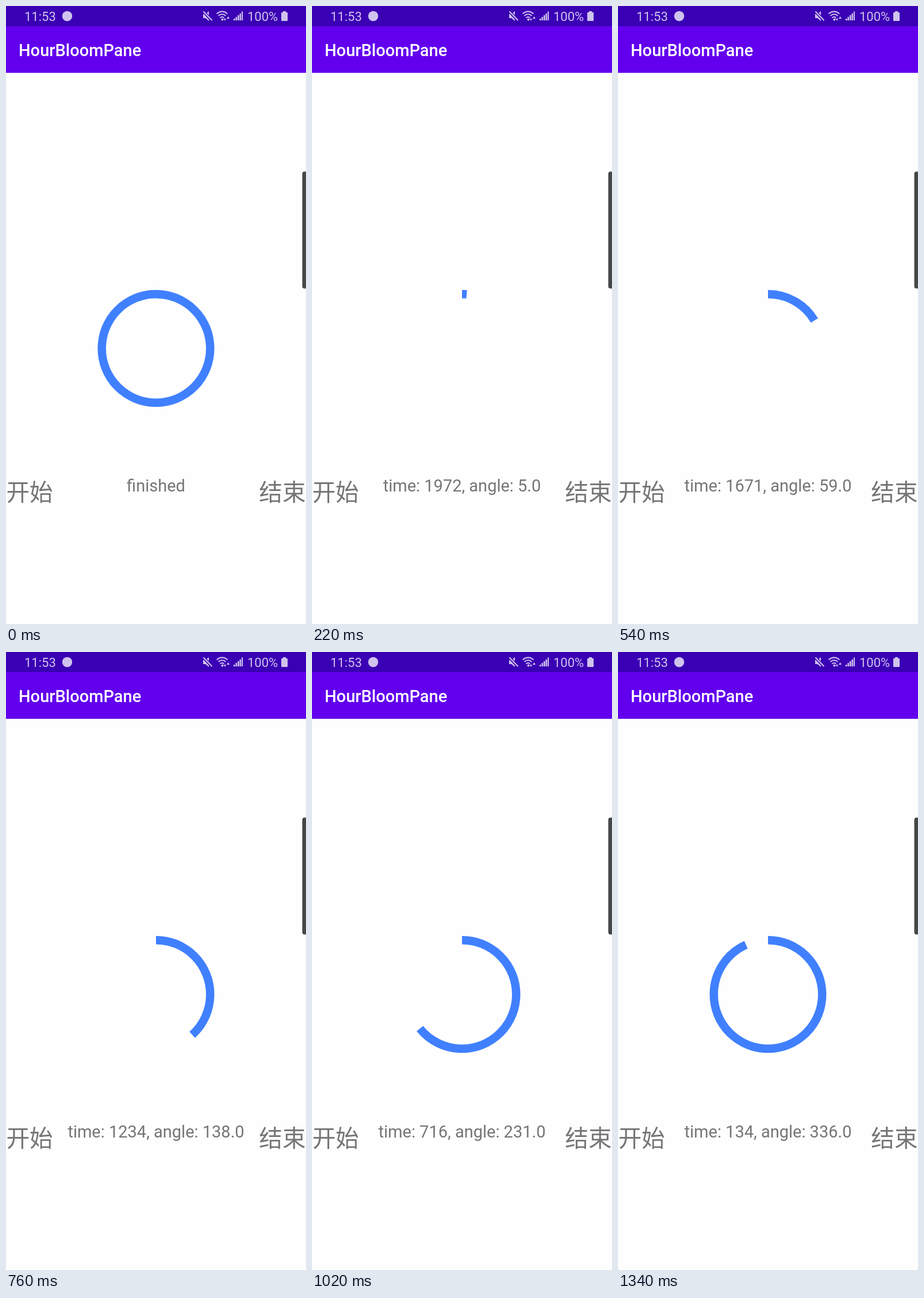
An HTML page that plays this animation: 522x1073 px, repeating every 1.36 s.

```html
<!DOCTYPE html>
<html lang="zh">
<head>
<meta charset="utf-8">
<title>Countdown ring</title>
<style>
  html, body { margin: 0; height: 100%; overflow: hidden; background: #fefefe; }
  svg { display: block; width: 522px; height: 1073px; font-family: Roboto, sans-serif; }
  .status { fill: #d0c3ed; font-size: 22px; }
  .line { fill: none; stroke: #d0c3ed; stroke-width: 2; }
  .title { fill: #fff; font-size: 29px; font-weight: 500; }
  .label { fill: #757575; font-size: 29px; text-anchor: middle; }
  .button { fill: #757575; font: 40.6px "Noto Sans CJK SC", "Noto Sans CJK", sans-serif; }
</style>
</head>
<body>
<svg viewBox="0 0 522 1073">
  <rect width="522" height="116" fill="#6200ee"/>
  <rect width="522" height="35" fill="#3a00b4"/>
  <g class="status">
    <text x="32" y="26">11:53</text>
    <circle cx="106.5" cy="17.5" r="8.7"/>
    <!-- muted speaker -->
    <path d="M343 14h4l6-5v17l-6-5h-4z"/>
    <path d="M343 9l15 16" stroke="#3a00b4" stroke-width="5"/>
    <path class="line" d="M343.5 9.5l15 15.5"/>
    <!-- wifi with traffic arrows -->
    <path class="line" d="M366.500 13.500Q376 5.500 385.500 13.500M369.500 17Q376 11.500 382.500 17M372.500 20.500Q376 17.500 379.500 20.500"/>
    <circle cx="376.500" cy="23.500" r="2"/>
    <path d="M379 22h4l-2 4zM384 22h5l-2.500-4z"/>
    <path d="M396 22h2.500v3h-2.500zM399.500 19h2.500v6h-2.500zM403 16h2.500v9h-2.500zM406.500 13h2.500v12h-2.500zM410 9.500h2v15.500h-2z"/>
    <text x="420" y="26">100%</text>
    <path d="M482 9h5v2h2q1 0 1 1v13q0 1-1 1h-9q-1 0-1-1v-13q0-1 1-1h2z"/>
  </g>
  <text class="title" x="22" y="87">HourBloomPane</text>
  <rect x="515.500" y="287.500" width="12" height="203" rx="4" fill="#464847"/>
  <circle id="ring" cx="261" cy="594.500" r="94.300" pathLength="360" transform="rotate(-90 261 594.5)"
    fill="none" stroke="#4080ff" stroke-width="14.500"/>
  <text class="button" x="0.500" y="858.500">开始</text>
  <text class="label" id="label" x="261" y="843"></text>
  <text class="button" x="521.500" y="858.500" text-anchor="end">结束</text>
</svg>
<script>
const LOOP = 1360, STEP = 20, START = 220, TOTAL = 2000;
// [loop time, remaining countdown], both in ms
const keys = [[220, 1972], [400, 1819], [540, 1671], [760, 1234], [1020, 716], [1340, 134]];
const ring = document.getElementById("ring");
const label = document.getElementById("label");

function remaining(t) {
  const i = Math.max(1, keys.findIndex(([time]) => time >= t));
  const [t0, v0] = keys[i - 1], [t1, v1] = keys[i];
  return Math.round(v0 + (v1 - v0) * (t - t0) / (t1 - t0));
}

function draw() {
  const t = Math.floor(performance.now() % LOOP / STEP) * STEP;
  if (t < START) {
    ring.removeAttribute("stroke-dasharray");
    label.textContent = "finished";
  } else {
    const left = remaining(t);
    const angle = Math.round((TOTAL - left) / TOTAL * 360);
    ring.setAttribute("stroke-dasharray", `${angle} 360`);
    label.textContent = `time: ${left}, angle: ${angle}.0`;
  }
  requestAnimationFrame(draw);
}
draw();
</script>
</body>
</html>
```
